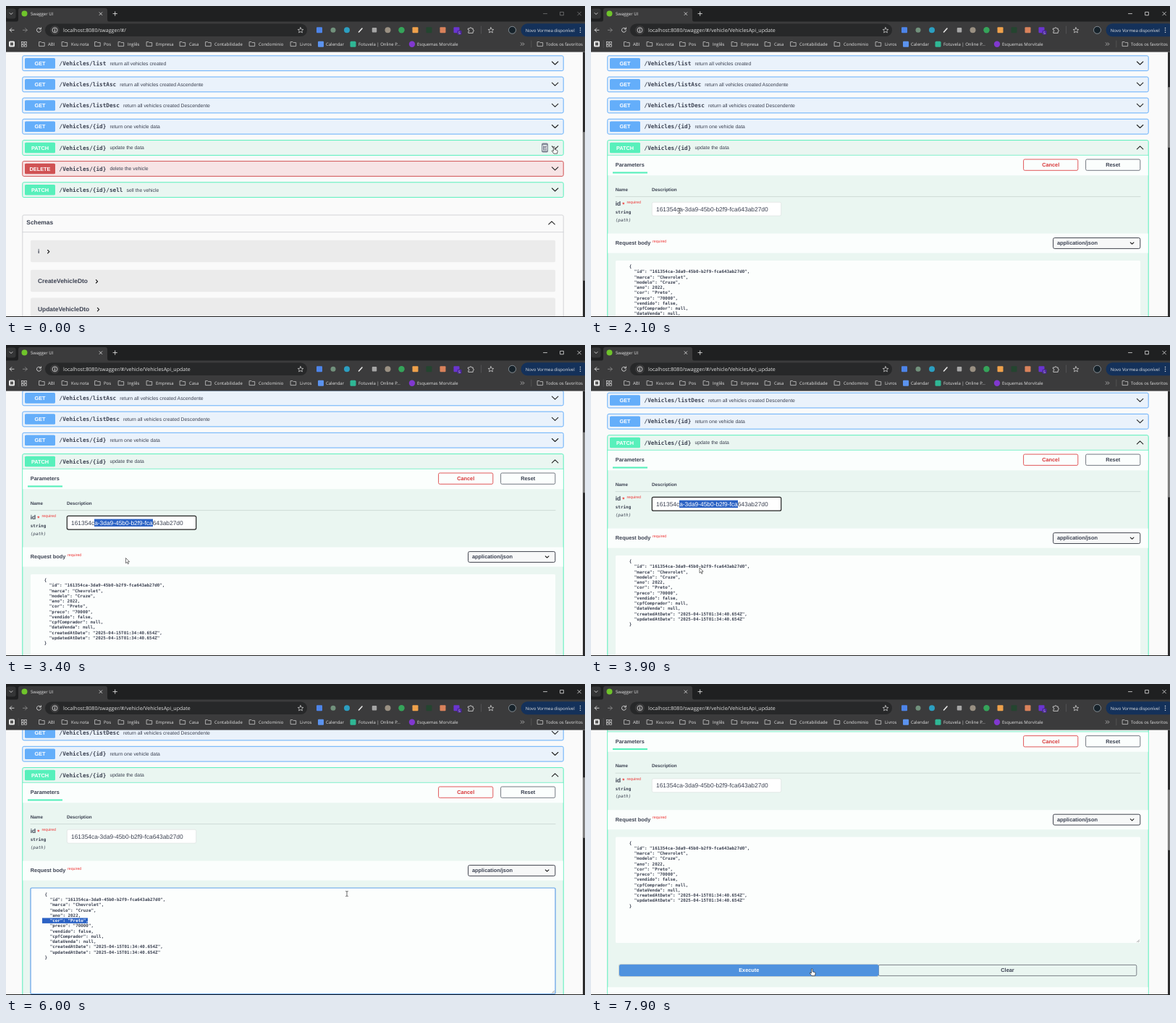
Recreate the animation shown at these times as an HTML page. Size 800 px wide and 430 px high, loop 8 s.

```html
<!DOCTYPE html>
<html lang="pt-BR">
<head>
<meta charset="utf-8">
<title>Swagger UI</title>
<style>
html, body { margin: 0; width: 100%; height: 100%; overflow: hidden; background: #fafafa; }
svg { display: block; width: 100vw; height: 100vh; }
text { font-family: "Liberation Sans", Arial, sans-serif; fill: #3b4151; text-rendering: geometricPrecision; }
.ui { font: 6px "Open Sans", "Noto Sans", sans-serif; fill: #e3e3e3; }
.mono { font-family: "DejaVu Sans Mono", monospace; }
.b { font-weight: 700; }
.mid { text-anchor: middle; }
.line { fill: none; stroke-linecap: round; stroke-linejoin: round; }
</style>
</head>
<body>
<svg id="stage" viewBox="0 0 800 430"></svg>
<script>
const LOOP = 8000, STEP = 100;
const GET = '#64aefa', PATCH = '#57f0bb', DEL = '#d05253', INK = '#3b4151';
const ID = '161354ca-3da9-45b0-b2f9-fca643ab27d0';
const JSON_LINES = [
  '{', `"id": "${ID}",`, '"marca": "Chevrolet",', '"modelo": "Cruze",', '"ano": 2022,',
  '"cor": "Preto",', '"preco": "70000",', '"vendido": false,', '"cpfComprador": null,',
  '"dataVenda": null,', '"createdAtDate": "2025-04-15T01:34:40.654Z",',
  '"updatedAtDate": "2025-04-15T01:34:40.654Z"', '}'
];

const rect = (x, y, w, h, fill, more = '') =>
  `<rect x="${x}" y="${y}" width="${w}" height="${h}" fill="${fill}" ${more}/>`;
const text = (x, y, s, size, cls = '', more = '') =>
  `<text x="${x}" y="${y}" class="${cls}" style="font-size:${size}px" ${more}>${s}</text>`;
const line = (d, color, w = 1, more = '') =>
  `<path class="line" d="${d}" stroke="${color}" stroke-width="${w}" ${more}/>`;
const dot = (x, y, r, fill, more = '') => `<circle cx="${x}" cy="${y}" r="${r}" fill="${fill}" ${more}/>`;
const group = (id, body, more = '') => `<g id="${id}" ${more}>${body}</g>`;
const chevron = (x, y, up) => line(`M${x - 4.2} ${y + (up ? 2 : -2)}l4.2 ${up ? -4 : 4} 4.2 ${up ? 4 : -4}`, '#222', 1.1);

function summary(c, method, path, note, color, open) {
  const end = 73.5 + path.length * 4.635 + 5;
  return rect(26, c - 7.3, 42, 14.6, color, 'rx="1.6"') +
    text(47, c + 2.6, method, 7.35, 'b mid', 'style="fill:#fff"').replace('px"', 'px;fill:#fff"') +
    text(73.5, c + 2.7, path, 7.7, 'mono b') +
    text(end, c + 2.3, note, 6.83) + chevron(758.6, c - 0.2, open);
}
function row(c, method, path, note, color, fill) {
  return rect(22.8, c - 10.4, 747.4, 20.8, fill, `rx="2" stroke="${color}" stroke-width="1"`) +
    summary(c, method, path, note, color);
}
const getRow = (c, path, note) => row(c, 'GET', path, note, GET, '#eaf2fb');

function schema(y, h, name, x) {
  return rect(34, y, 725, h, '#ebebeb', 'rx="2"') + text(44, y + 18.2, name, 8.4, 'b') +
    line(`M${x - 1.2} ${y + 13.8}l2.2 2.2-2.2 2.2`, '#111', 1.1);
}
function button(x, y, w, h, label, color, ink, fill = 'none') {
  return rect(x, y, w, h, fill, `rx="1.8" stroke="${color}"`) +
    `<text class="b mid" x="${x + w / 2}" y="${y + h / 2 + 2.5}" style="font-size:7.35px;fill:${ink}">${label}</text>`;
}
const required = (x, y) => text(x, y, 'required', 5.25).replace('px"', 'px;fill:#e33"');

function closedPart() {
  return row(196, 'PATCH', '/Vehicles/{id}', 'update the data', PATCH, '#e9f6f1') +
    row(225, 'DELETE', '/Vehicles/{id}', 'delete the vehicle', DEL, '#f7e4e5') +
    row(254.2, 'PATCH', '/Vehicles/{id}/sell', 'sell the vehicle', PATCH, '#e9f6f1') +
    rect(22.8, 289, 747.4, 200, 'none', 'rx="2" stroke="#c9cbcf" stroke-width=".8"') +
    line('M23 312.6H770', '#c9cbcf', 0.7) + text(28.3, 302.2, 'Schemas', 8.4, 'b') +
    chevron(754, 299.8, true) +
    schema(323.7, 30.5, 'i', 58.8) + schema(364.8, 30.5, 'CreateVehicleDto', 125.6) +
    schema(403.6, 30.5, 'UpdateVehicleDto', 127.6);
}

function openPart() {
  const inputText = color => text(90, 283.7, ID, 8.4).replace('px"', `px;fill:${color}"`);
  const json = JSON_LINES.map((s, i) =>
    text(s.length > 1 ? 59.8 : 52.7, 362.1 + i * 7.25, s, 5.9, 'mono b')).join('');
  const area = rect(34, 352, 725, 146.5, '#fcfefd', 'id="area" rx="1.5"');
  return rect(22.8, 185.6, 747.4, 500, '#eaf6f1', `rx="2" stroke="${PATCH}"`) +
    rect(23.3, 206.6, 746.4, 27.6, '#fbfefd') + line('M23 206.3H770', PATCH, 0.7) +
    summary(196, 'PATCH', '/Vehicles/{id}', 'update the data', PATCH, true) +
    text(33.8, 222.2, 'Parameters', 7.35, 'b') + rect(30, 229.4, 48, 2.1, PATCH) +
    button(597.6, 212, 75.2, 15.3, 'Cancel', '#e0585a', '#d8383a') +
    button(683.6, 212, 75.2, 15.3, 'Reset', '#747982', INK) +
    text(33.8, 255.7, 'Name', 6.3, 'b') + text(84, 255.7, 'Description', 6.3, 'b') +
    line('M34 263.6H759', '#c3d0cd', 0.7) +
    text(33.8, 276.4, 'id', 8.4, 'b') + text(43.2, 276.8, '*', 8, 'b').replace('px"', 'px;fill:#e33"') +
    required(49.6, 273) + text(33.8, 287, 'string', 5.95, 'mono b') +
    text(33.8, 297.6, '(path)', 5.95, 'mono', 'font-style="italic"') +
    rect(84.3, 271.3, 178.4, 18.8, '#fff', 'id="field" rx="2"') + inputText(INK) +
    group('idSel', rect(122, 275.6, 81, 10.4, '#2b62c4', 'id="idMark"') +
      `<g clip-path="url(#idClip)">${inputText('#fff')}</g>`) +
    rect(23.3, 314.6, 746.4, 27, '#fbfefd') +
    text(33.8, 330.3, 'Request body', 7.35, 'b') + required(85, 326.8) +
    rect(638.6, 320.6, 120.2, 14.8, '#f7f8f8', 'rx="2" stroke="#41444e"') +
    text(644, 330.3, 'application/json', 7.35, 'b') + line('M745.3 327l2.3 2.2 2.3-2.2', '#222', 1.1) +
    area + line('M754.5 497.2l3-3M756.4 497.2l1.1-1.1', '#666', 0.6) +
    group('json', json) +
    group('lineSel', rect(50, 393.5, 63, 7.4, '#2b62c4', 'id="lineMark"') +
      `<g clip-path="url(#lineClip)">${text(60.7, 399.25, JSON_LINES[5], 5.9, 'mono b').replace('px"', 'px;fill:#fff"')}</g>`) +
    line('M113.2 393.4v7.2', '#111', 0.6, 'id="caret"') +
    rect(38, 527.5, 360, 18, '#000', 'id="glow" rx="3" opacity=".14"') +
    button(397.2, 528.8, 356.6, 15, 'Clear', '#7b8188', INK) +
    button(39.5, 528.8, 357.5, 15, 'Execute', '#4990e2', '#fff', '#4f92de') +
    rect(23.3, 559.6, 746.4, 27, '#fbfefd');
}

const folder = x => line(`M${x + .5} 49.6h2.6l1 1h3.6v5h-7.2z`, '#c7c7c7', 0.8);
function browser() {
  const marks = [[45.5, 58, 'ABI'], [77, 90, 'Kvu nota'], [122.5, 135, 'Pos'], [155, 168, 'Inglês'],
    [194, 207, 'Empresa'], [240, 253, 'Casa'], [275.5, 288, 'Contabilidade'],
    [336, 349, 'Condominio'], [393, 406, 'Livros'], [734, 746, 'Todos os favoritos']];
  const links = [[442, 'Calendar'], [487, 'Fotuvela | Online P...'], [568, 'Esquemas Morvitale']];
  const ui = (x, y, s, size = 6) => text(x, y, s, size, 'ui');
  const square = (x, fill, n = 8) => rect(x - n / 2, 33.3 - n / 2, n, n, fill, 'rx="1"');
  return rect(0, 0, 800, 63.6, '#3b3b3c') + rect(0, 0, 800, 21.5, '#1f2021') +
    '<path d="M14 22q3 0 3-4V6q0-3 3-3H137q3 0 3 3v12q0 4 3 4z" fill="#3b3b3c"/>' +
    rect(0.5, 3.5, 13, 14, '#343536', 'rx="3"') + line('M5 9.6l2 2 2-2', '#ddd', 0.9) +
    dot(25.5, 10.6, 4, '#6fc42b') + ui(34, 12.8, 'Swagger UI') +
    line('M129 8.8l3.8 3.8m0-3.8l-3.8 3.8', '#ddd', 0.8) + line('M148 10.6h5.4m-2.7-2.7v5.4', '#ddd', 0.9) +
    group('controls', line('M742.5 10.6h5M766 8.4h4.4v4.4h-4.4zM789.8 8.3l4.6 4.6m0-4.6l-4.6 4.6', '#e0e0e0', 0.8)) +
    line('M11 33.3H5.2m2.6-2.6l-2.6 2.6 2.6 2.6', '#ddd', 0.9) +
    line('M23.4 33.3h5.8m-2.6-2.6l2.6 2.6-2.6 2.6', '#8a8a8a', 0.9) +
    line('M48 31.6a3 3 0 1 0 .4 2.4M48.4 29.8v2.2h-2.2', '#ddd', 0.9) +
    rect(54, 24.5, 362, 17.5, '#272829', 'rx="8.7"') + dot(67.5, 33.3, 6.3, '#3b3b3c') +
    line('M67.5 32.8v2.5M67.5 31.2v.1', '#ddd', 0.9) + dot(67.5, 33.3, 3.4, 'none', 'stroke="#ddd" stroke-width=".8"') +
    ui(79, 35.8, '', 7.04).replace('<text', '<text id="url"') +
    line('M407 29.7l1.1 2.5 2.7.3-2 1.8.6 2.6-2.4-1.4-2.4 1.4.6-2.6-2-1.8 2.7-.3z', '#ddd', 0.7) +
    square(433, '#4d84e8') + dot(452, 33.3, 3.5, '#71917c') + dot(471, 33.3, 4, '#2c9fc1') +
    line('M487.5 36l4.5-5', '#e8e8e8', 1.6) + square(509, '#a5a5a5', 6.5) + dot(527.5, 33.3, 4, '#9a9082') +
    dot(546.5, 33.3, 4.2, '#35a45a') + square(565.5, '#efa14b') + square(584.5, '#24452f') +
    square(603.5, '#d9825b') + square(622.5, '#6a35d0') + rect(623.5, 33.8, 6, 5.6, '#4b24a0', 'rx="1"') +
    ui(625, 38.6, '5', 5) +
    line('M638.8 31h2a1.2 1.2 0 0 1 2.4 0h2v2a1.2 1.2 0 0 1 0 2.4v2h-6.4v-2a1.2 1.2 0 0 0 0-2.4z', '#ddd', 0.8) +
    line('M656.5 28v10', '#5c5c5d', 0.7) +
    line('M670 29.7l1.1 2.5 2.7.3-2 1.8.6 2.6-2.4-1.4-2.4 1.4.6-2.6-2-1.8 2.7-.3z', '#ddd', 0.7) +
    dot(699.5, 33.3, 5, '#17232b', 'stroke="#aab4ba" stroke-width=".7"') +
    rect(711.5, 24.3, 95, 18, '#14315a', 'rx="9"') + ui(717.7, 35.5, 'Novo Vormea disponível') +
    [30.4, 33.3, 36.2].map(y => dot(793.5, y, 0.75, '#e3e3e3')).join('') +
    rect(4, 48.5, 8, 8, '#e8e8e8', 'rx="1.6"') + rect(6, 50.5, 4, 4, '#555') +
    line('M17.2 47.5v10', '#5c5c5d', 0.6) +
    [[21.5, 49.5], [25.7, 49.5], [21.5, 53.6], [25.7, 53.6]].map(p =>
      rect(p[0], p[1], 2.6, 2.6, 'none', 'stroke="#ddd" stroke-width=".7"')).join('') +
    marks.map(([x, tx, s]) => folder(x) + ui(tx, 54.6, s)).join('') +
    links.map(([x, s]) => ui(x, 54.6, s)).join('') +
    rect(431, 48.7, 8, 8, '#5b93ee', 'rx="1"') + rect(475.5, 48.7, 8, 8, '#2fb795', 'rx="1.5"') +
    dot(561, 52.7, 4.2, '#8038cf') +
    line('M711.3 50.8l1.8 1.8-1.8 1.8m2.8-3.6l1.8 1.8-1.8 1.8', '#ddd', 0.7) +
    line('M725.8 48v9', '#5c5c5d', 0.7) +
    rect(797, 63.6, 3, 366, '#2c2c2d') + rect(797.6, 0, 2, 10, '#a0a0a0', 'id="thumb" rx="1"') +
    rect(0, 429, 800, 1, '#202021');
}

const copyIcon = group('copy', rect(734.6, 189.4, 13.2, 13.2, '#7d8492', 'id="copyBox" rx="2"') +
  `<g id="copyMark">${line('M738.4 192.8h5.6v7h-5.6zM740 192v1.6h2.4V192M740.2 196h3.6m-3.6 1.8h2.4', '#fff', 0.8)}</g>`);
const cursors =
  group('hand', '<path d="M-.9.8a.9.9 0 0 1 1.8 0V4l3 .8q1 .3.9 1.4L4.2 9.6H-.4L-3 6.2q-.2-1 .9-.8L-.9 6.2z" fill="#fff" stroke="#222" stroke-width=".7"/>') +
  group('arrow', '<path d="M0 0V7.2L1.7 5.7 2.9 8.3 4 7.8 2.9 5.2H5.1z" fill="#fff" stroke="#222" stroke-width=".6"/>') +
  group('beam', line('M-1.4-3.6q1.4 0 1.4.8V2.8q0 .8-1.4.8M1.4-3.6q-1.4 0-1.4.8M0 2.8q0 .8 1.4.8', '#333', 0.7));

document.getElementById('stage').innerHTML =
  `<defs><clipPath id="idClip">${rect(122, 275, 81, 12, '#000', 'id="idCut"')}</clipPath>
   <clipPath id="lineClip">${rect(50, 393, 63, 8, '#000', 'id="lineCut"')}</clipPath></defs>` +
  rect(0, 0, 800, 430, '#fafafa') +
  group('page', getRow(79.2, '/Vehicles/list', 'return all vehicles created') +
    getRow(108.4, '/Vehicles/listAsc', 'return all vehicles created Ascendente') +
    getRow(137.5, '/Vehicles/listDesc', 'return all vehicles created Descendente') +
    getRow(166.7, '/Vehicles/{id}', 'return one vehicle data') +
    group('closed', closedPart()) + group('open', openPart()) + copyIcon) +
  browser() + group('cursor', cursors);

const el = {};
document.querySelectorAll('[id]').forEach(n => el[n.id] = n);
const show = (id, on) => { el[id].style.display = on ? '' : 'none'; };
const set = (id, attrs) => { for (const k in attrs) el[id].setAttribute(k, attrs[k]); };

// time, x, y, shape
const PATH = [
  [0, 757.3, 194.5, 'hand'], [400, 757.3, 194.5, 'hand'], [700, 728.5, 189.5, 'hand'],
  [1000, 690, 197, 'arrow'], [1400, 430, 240, 'arrow'], [1800, 150, 279, 'beam'],
  [2100, 122, 283, 'beam'], [2300, 122, 283, 'beam'], [2700, 203, 283, 'beam'],
  [2900, 203, 283, 'arrow'], [3400, 165.5, 294.5, 'arrow'], [3900, 150, 308, 'arrow'],
  [4200, 128, 322, 'beam'], [4500, 117, 326, 'beam'], [4900, 117, 326, 'beam'],
  [5300, 50, 326, 'beam'], [5500, 50, 326, 'beam'], [6000, 471, 290, 'beam'],
  [6300, 480, 282, 'beam'], [6500, 485, 262, 'arrow'], [6800, 485, 262, 'arrow'],
  [7200, 455, 360, 'arrow'], [7500, 430, 393.5, 'hand'], [7899, 430, 393.5, 'hand'],
  [7900, 305.3, 393.8, 'hand'], [8000, 305.3, 393.8, 'hand']
];
const SCROLL = [[0, 0], [2900, 0], [3200, 35], [3700, 35], [4000, 70], [6800, 70], [7000, 105], [7100, 105], [7400, 140.4], [8000, 140.4]];

function at(track, t) {
  let i = 0;
  while (i < track.length - 2 && track[i + 1][0] <= t) i++;
  const a = track[i], b = track[i + 1];
  const p = Math.min(1, (t - a[0]) / (b[0] - a[0])), e = p * p * (3 - 2 * p);
  return a.map((v, k) => typeof v === 'number' ? v + (b[k] - v) * e : v);
}

function draw(t) {
  const [, x, y, kind] = at(PATH, t), scroll = at(SCROLL, t)[1];
  const open = t >= 400, fieldOn = t >= 2300 && t < 4500, areaOn = t >= 4500 && t < 6600;
  el.url.textContent = 'localhost:8080/swagger/#/' + (open ? 'vehicle/VehiclesApi_update' : '');
  show('closed', !open);
  show('open', open);
  set('page', { transform: `translate(0 ${-scroll})` });
  set('thumb', open ? { y: 112 + scroll * 0.243, height: 84 } : { y: 174, height: 206 });
  set('controls', { opacity: t < 100 ? 0.45 : 1 });

  const wide = t >= 100;
  show('copy', t < 1100);
  set('copyBox', wide ? { x: 734.6, width: 13.2 } : { x: 740, width: 9 });
  set('copyMark', { transform: wide ? '' : 'translate(3.4 0)' });

  set('field', fieldOn ? { stroke: '#222', 'stroke-width': 1.2 } : { stroke: '#d9dedc', 'stroke-width': 0.6 });
  const idEnd = Math.max(0, Math.min(81, (t - 2300) / 400 * 81));
  show('idSel', fieldOn);
  set('idMark', { width: idEnd });
  set('idCut', { width: idEnd });

  set('area', areaOn ? { stroke: '#5f9fe8', 'stroke-width': 1.2 } : { stroke: 'none' });
  set('json', { transform: areaOn ? 'translate(.9 .9)' : '' });
  const span = Math.max(0, Math.min(63, (t - 4900) / 400 * 63));
  show('caret', areaOn && t < 4900);
  show('lineSel', areaOn && span > 0);
  for (const id of ['lineMark', 'lineCut']) set(id, { x: 113 - span, width: span });

  show('glow', t >= 7900);
  set('cursor', { transform: `translate(${x} ${y})` });
  for (const id of ['hand', 'arrow', 'beam']) show(id, id === kind);
}

const start = performance.now();
function tick() {
  const t = (performance.now() - start) % LOOP;
  draw(Math.floor(t / STEP) * STEP);
  requestAnimationFrame(tick);
}
draw(0);
tick();
</script>
</body>
</html>
```
